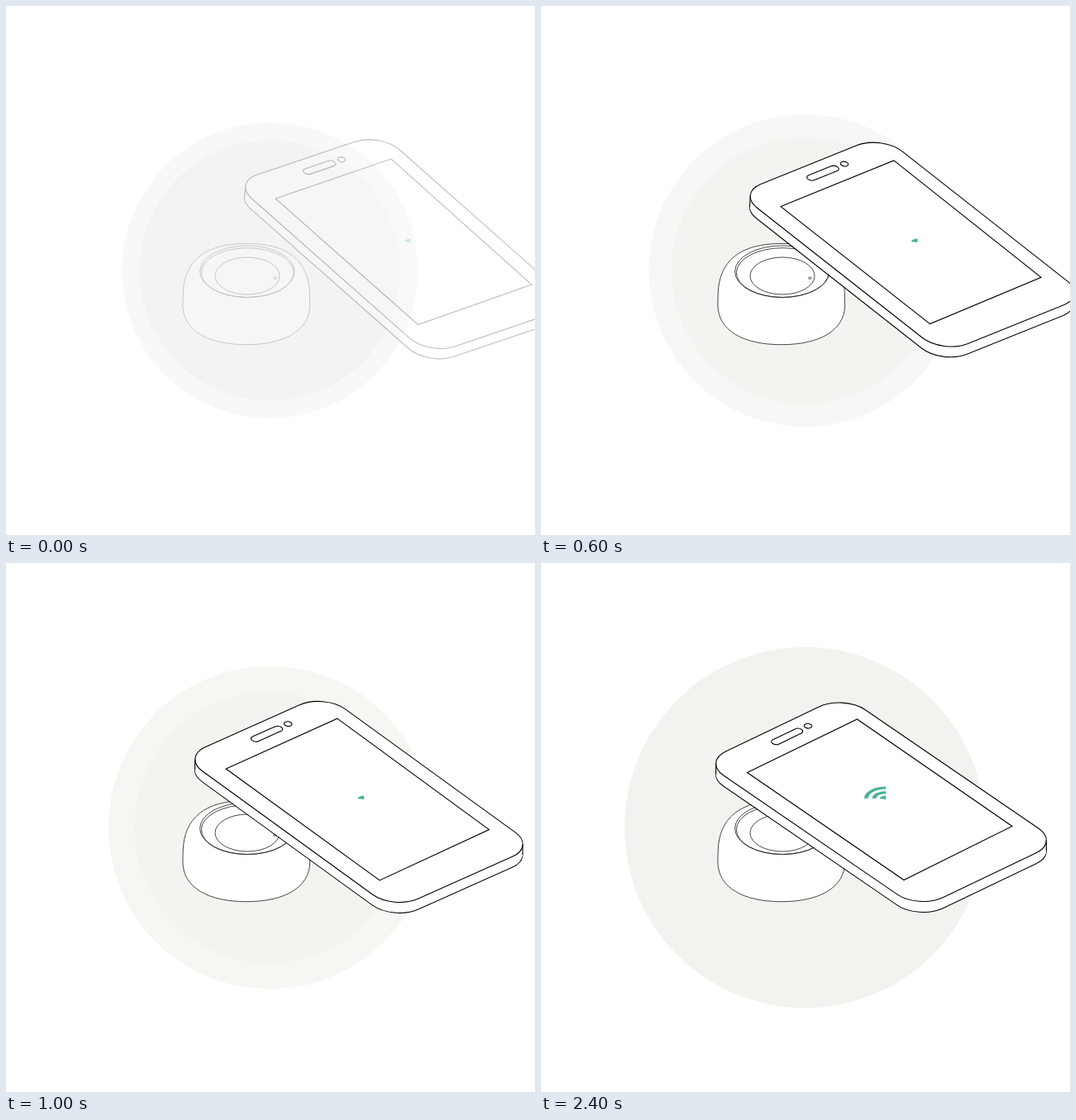
Write an HTML page with a canvas that moves like this. It is 640 px wide and 640 px high and loops after 3600 ms.

```html
<!DOCTYPE html>
<html lang="en">
<head>
<meta charset="utf-8">
<title>Phone over sensor</title>
<style>
  html, body { margin: 0; width: 100%; height: 100%; overflow: hidden; background: #fff; }
  canvas { display: block; width: 640px; height: 640px; }
</style>
</head>
<body>
<canvas id="stage" width="640" height="640"></canvas>
<script>
const LOOP = 3600, STEP = 100, GREEN = '#46b294';
const stage = document.getElementById('stage').getContext('2d');
const layer = document.createElement('canvas');
layer.width = layer.height = 640;
const art = layer.getContext('2d');

// Phone poses: origin and the two edge vectors of its face, depth, display corners.
const START = {
  o: [275.6, 213.8], u: [177.5, -60.2], v: [236, 208.7], depth: [-1.3, 12.4],
  display: [326, 233, 466, 185, 636, 337, 498.5, 385.5]
};
const END = {
  o: [196.9, 240.7], u: [169.2, -81], v: [260, 178], depth: [0, 13],
  display: [249.5, 253.5, 382.5, 189, 570, 318.5, 439, 383.5]
};
const ACUTE = { x: .157, y: .092 }, OBTUSE = { x: .176, y: .1 };

const mix = (a, b, t) => a + (b - a) * t;
const mixAll = (a, b, t) => a.map((n, i) => mix(n, b[i], t));

function poseAt(t) {
  const pose = {};
  for (const key in START) pose[key] = mixAll(START[key], END[key], t);
  return pose;
}

// Builds a path in the phone's plane, shifted by a share of its depth.
function onFace(p, build, share = 0) {
  art.save();
  art.setTransform(p.u[0], p.u[1], p.v[0], p.v[1],
    p.o[0] + p.depth[0] * share, p.o[1] + p.depth[1] * share);
  art.beginPath();
  build();
  art.restore();
}

const body = () => art.roundRect(0, 0, 1, 1, [ACUTE, OBTUSE, ACUTE, OBTUSE]);
const speaker = () => art.roundRect(.507 - .104, .0577 - .0146, .208, .0292, { x: .025, y: .0146 });
const camera = () => art.ellipse(.66, .0556, .0208, .0124, 0, 0, 7);

// Outermost point of a rounded acute corner: side -1 is left, 1 is right.
function extreme(p, side) {
  const s = p.u.map(n => n * ACUTE.x), t = p.v.map(n => n * ACUTE.y);
  const len = Math.hypot(s[0], t[0]);
  return [0, 1].map(i => {
    const corner = p.o[i] + (side > 0 ? p.u[i] + p.v[i] : 0);
    return corner - side * (s[i] + t[i]) + side * (s[0] * s[i] + t[0] * t[i]) / len;
  });
}

function drawPhone(p) {
  art.strokeStyle = '#000';
  art.fillStyle = '#fff';
  art.lineWidth = 1.1;
  onFace(p, body, 1);
  art.stroke();
  for (let d = 12; d >= 0; d--) {
    onFace(p, body, d / 13);
    art.fill();
  }
  art.stroke();
  art.beginPath();
  for (const side of [-1, 1]) {
    const [x, y] = extreme(p, side);
    art.moveTo(x, y);
    art.lineTo(x + p.depth[0], y + p.depth[1]);
  }
  art.stroke();
  for (const part of [speaker, camera]) {
    onFace(p, part);
    art.stroke();
  }
  art.beginPath();
  for (let i = 0; i < 8; i += 2) art.lineTo(p.display[i], p.display[i + 1]);
  art.closePath();
  art.stroke();
}

function oval(x, y, rx, ry) {
  art.beginPath();
  art.ellipse(x, y, rx, ry, 0, 0, 7);
  art.stroke();
}

function drawSensor() {
  art.strokeStyle = '#1c1c1c';
  art.fillStyle = '#fff';
  art.lineWidth = .8;
  art.beginPath();
  art.moveTo(213.9, 362);
  art.lineTo(214.2, 348);
  art.bezierCurveTo(215.5, 308, 241, 287.4, 291, 287.4);
  art.bezierCurveTo(341, 287.4, 366.1, 308, 367.4, 348);
  art.lineTo(367.7, 362);
  art.bezierCurveTo(367.2, 393, 336.5, 409.7, 290.8, 409.7);
  art.bezierCurveTo(245, 409.7, 214.4, 393, 213.9, 362);
  art.closePath();
  art.fill();
  art.stroke();
  oval(291.8, 321.2, 57.2, 31.3);
  oval(292.2, 322.6, 55.8, 29.9);
  oval(292, 326.5, 39, 22.5);
  oval(325.4, 329.2, 1.6, 1.2);
}

function wave(x, rx, ry, wide, high) {
  const y = 284.7;
  art.beginPath();
  art.ellipse(x, y, rx, ry, 0, Math.PI, Math.PI * 1.5);
  art.ellipse(x, y, rx - wide, ry - high, 0, Math.PI * 1.5, Math.PI, true);
  art.closePath();
  art.fill();
}

function drawSignal(x, waves) {
  art.fillStyle = GREEN;
  art.beginPath();
  art.moveTo(x - 7.5, 284);
  art.quadraticCurveTo(x - 5, 281.3, x, 281.5);
  art.lineTo(x, 286);
  art.quadraticCurveTo(x - 3.5, 285.2, x - 7.2, 285.2);
  art.fill();
  if (waves > 0) wave(x, 16.6, 8.8, 5, 3);
  if (waves > 1) wave(x, 26.3, 14.2, 4.8, 3);
}

function disc(r, from, to, t) {
  stage.fillStyle = `rgb(${mixAll(from, to, t).map(Math.round)})`;
  stage.beginPath();
  stage.arc(319.2, 320, r, 0, 7);
  stage.fill();
}

function draw(ms) {
  // The picture advances in steps and rests twice near the end.
  const k = ms >= 2400 ? 24 : Math.min(13, Math.floor(ms / STEP));
  const slide = Math.min(1, k / 12.8);
  const tint = [242, 243, 238];

  stage.globalAlpha = 1;
  stage.fillStyle = '#fff';
  stage.fillRect(0, 0, 640, 640);
  disc(179 + 1.633 * k, [248, 248, 247], tint, k / 24);
  disc(157.8 + .63 * k, [243, 243, 241], tint, k / 24);

  art.clearRect(0, 0, 640, 640);
  drawSensor();
  drawPhone(poseAt(slide));
  drawSignal(mix(489.4, 417.3, slide), k < 13 ? 0 : k < 24 ? 1 : 2);
  stage.globalAlpha = Math.min(1, .25 + k * .375);
  stage.drawImage(layer, 0, 0);
}

const begin = performance.now();
function tick() {
  draw((performance.now() - begin) % LOOP);
  requestAnimationFrame(tick);
}
tick();
</script>
</body>
</html>
```
